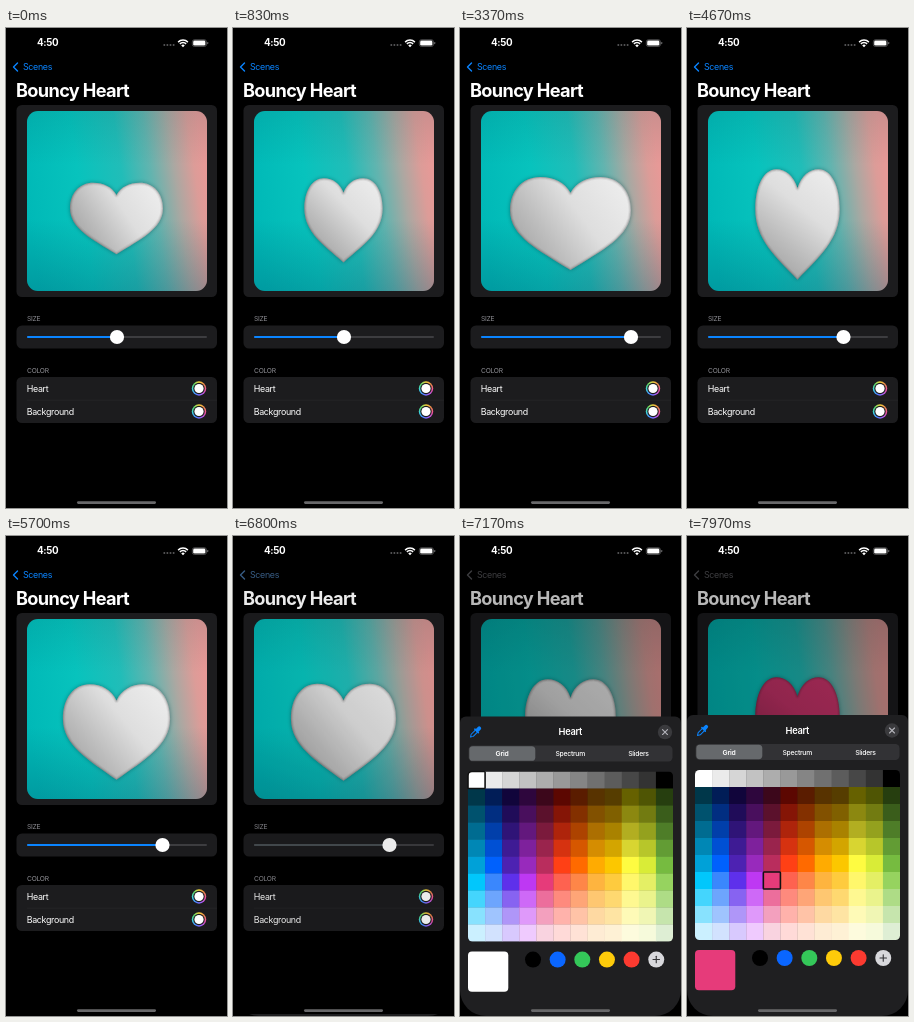
An HTML page with a canvas for the animation above (8000 ms loop, 221 by 480 pixels).

```html
<!DOCTYPE html>
<html lang="en">
<head>
<meta charset="utf-8">
<title>Bouncy Heart</title>
<style>
html, body { margin: 0; width: 100%; height: 100%; overflow: hidden; background: #000; }
canvas { display: block; width: 221px; height: 480px; }
</style>
</head>
<body>
<canvas id="stage"></canvas>
<script>
const W = 221, H = 480, LOOP = 8000;
const FONT = 'Inter, "Liberation Sans", sans-serif';
const BLUE = [10, 132, 255], WHITE = [255, 255, 255], PINK = [230, 59, 122];
const SHEET_Y = 179, SHEET_START = 6795, PICK = 7570;

const canvas = document.getElementById('stage');
const dpr = window.devicePixelRatio || 1;
canvas.width = W * dpr;
canvas.height = H * dpr;
const c = canvas.getContext('2d');
c.scale(dpr, dpr);

const clamp = v => Math.min(1, Math.max(0, v));
const lerp = (a, b, k) => a + (b - a) * k;
const smooth = k => k * k * (3 - 2 * k);
const mix = (a, b, k) => a.map((v, i) => lerp(v, b[i], k));
const rgb = (a, k = 1) => `rgb(${a.map(v => Math.round(Math.min(255, v * k)))})`;
const hex = s => [0, 2, 4].map(i => parseInt(s.substr(i, 2), 16));

// Linear interpolation through [time, value] keys
function track(keys, t) {
  for (let i = 1; i < keys.length; i++) {
    const [t0, a] = keys[i - 1], [t1, b] = keys[i];
    if (t <= t1) return lerp(a, b, clamp((t - t0) / (t1 - t0)));
  }
  return keys[keys.length - 1][1];
}

function box(x, y, w, h, r, fill) {
  c.beginPath();
  c.roundRect(x, y, w, h, r);
  c.fillStyle = fill;
  c.fill();
}

function disc(x, y, r, fill) {
  c.beginPath();
  c.arc(x, y, r, 0, Math.PI * 2);
  c.fillStyle = fill;
  c.fill();
}

function line(points, color, width) {
  c.beginPath();
  points.forEach(([x, y]) => c.lineTo(x, y));
  c.strokeStyle = color;
  c.lineWidth = width;
  c.lineCap = c.lineJoin = 'round';
  c.stroke();
}

function text(s, x, y, size, color, weight = 400, align = 'left') {
  c.font = `${weight} ${size}px ${FONT}`;
  c.letterSpacing = -size * 0.037 + 'px';
  c.textAlign = align;
  c.fillStyle = color;
  c.fillText(s, x, y);
}

function gradient(x0, y0, x1, y1, stops) {
  const g = c.createLinearGradient(x0, y0, x1, y1);
  stops.forEach(([at, color]) => g.addColorStop(at, color));
  return g;
}

// Heart bounce: even phases are widest, odd phases are tallest
const PHASE = [[0, 0], [1870, 1.28], [3370, 2], [4670, 3], [6370, 4.12],
  [6730, 4.16], [6800, 4.37], [7170, 4.69], [7970, 5], [8000, 5.02]];

function knobX(t) {
  const up = smooth(clamp((t - 2500) / 780));
  const back = smooth(clamp((t - 3550) / 550));
  return 111 + 60 * up - 14.5 * back;
}

function heartPath(x, top, hw, h) {
  const side = s => {
    const p = (u, v) => [x + s * hw * u, top + h * v];
    const curve = (...q) => c.bezierCurveTo(...q.flatMap(([u, v]) => p(u, v)));
    return { p, curve };
  };
  const R = side(1), L = side(-1);
  c.beginPath();
  c.moveTo(...R.p(0, 0.17));
  R.curve([0.09, 0.06], [0.28, 0], [0.5, 0]);
  R.curve([0.8, 0], [1, 0.15], [1, 0.36]);
  R.curve([1, 0.64], [0.52, 0.79], [0, 1]);
  L.curve([0.52, 0.79], [1, 0.64], [1, 0.36]);
  L.curve([1, 0.15], [0.8, 0], [0.5, 0]);
  L.curve([0.28, 0], [0.09, 0.06], [0, 0.17]);
  c.closePath();
}

function heart(t) {
  const p = (1 - Math.cos(Math.PI * track(PHASE, t))) / 2;
  const s = 1 + 0.005 * (knobX(t) - 111);
  const hw = s * lerp(46.5, 34.4, p);
  const top = 174 - s * lerp(19.2, 26.6, p);
  const bottom = 174 + s * (52.3 + 11 * p ** 0.6);
  const base = mix(WHITE, PINK, clamp((t - PICK) / 200));
  const x = 110.5;

  c.save();
  heartPath(x, top, hw, bottom - top);
  c.shadowColor = 'rgba(0,50,55,.45)';
  c.shadowBlur = 4 * dpr;
  c.fillStyle = gradient(x - hw, bottom - 15, x + hw * 0.8, top, [
    [0, rgb(base, 0.62)], [0.3, rgb(base, 0.74)], [0.6, rgb(base, 0.87)], [1, rgb(base, 0.93)]]);
  c.fill();
  c.shadowColor = 'transparent';
  c.clip();
  // Soft darker rim
  [[5, 0.06], [3, 0.1], [1.4, 0.16]].forEach(([width, alpha]) => {
    c.strokeStyle = `rgba(40,40,45,${alpha})`;
    c.lineWidth = width;
    c.stroke();
  });
  c.restore();
}

function scene(t) {
  c.save();
  c.beginPath();
  c.roundRect(21, 83, 180, 180, 11);
  c.clip();
  c.fillStyle = gradient(22, 185, 202, 160, [
    [0, '#00b9b7'], [0.3, '#07c3bd'], [0.54, '#21bdb8'], [0.7, '#62b4af'],
    [0.83, '#aaa8a2'], [0.94, '#dc9c98'], [1, '#e79997']]);
  c.fillRect(21, 83, 180, 180);
  c.fillStyle = gradient(0, 83, 0, 263, [
    [0, 'rgba(0,70,75,.12)'], [0.3, 'rgba(0,70,75,0)'], [0.6, 'rgba(0,60,80,0)'], [1, 'rgba(0,60,90,.24)']]);
  c.fillRect(21, 83, 180, 180);
  heart(t);
  c.restore();
}

function colorWell(x, y) {
  const g = c.createConicGradient(-Math.PI / 2, x, y);
  ['#f5d33b', '#f28a4d', '#ef4fa0', '#a45cf5', '#4c7dff', '#3cd3e8', '#58dc70', '#f5d33b']
    .forEach((color, i) => g.addColorStop(i / 7, color));
  disc(x, y, 7.2, g);
  disc(x, y, 5.7, '#1c1c1e');
  disc(x, y, 4.6, '#fff');
}

function page(t) {
  const fade = clamp((t - 6700) / 150);
  const tint = rgb(mix(BLUE, [84, 84, 88], fade));
  const track = rgb(mix(BLUE, [72, 78, 82], clamp(fade * 1.5)));
  const card = '#1c1c1e';

  line([[11.5, 35], [7.5, 39], [11.5, 43]], tint, 1.4);
  text('Scenes', 17, 42.3, 8.9, tint);
  text('Bouncy Heart', 10, 69.3, 18.2, '#fff', 700);

  box(10.5, 77, 200.5, 192, 5.5, card);
  scene(t);

  text('SIZE', 21, 293.3, 6.7, '#8d8d93');
  box(10.5, 297.5, 200.5, 23, 5.5, card);
  const x = knobX(t);
  box(21, 308, 180, 2, 1, '#3d3d40');
  box(21, 308, x - 21, 2, 1, track);
  disc(x, 309, 7.1, '#fff');

  text('COLOR', 21, 344.5, 6.7, '#8d8d93');
  box(10.5, 349, 200.5, 46, 5.5, card);
  c.fillStyle = '#29292c';
  c.fillRect(21, 371.8, 190, 0.6);
  text('Heart', 20.7, 363.9, 8.9, '#fff');
  text('Background', 20.7, 386.8, 8.9, '#fff');
  colorWell(193, 360.5);
  colorWell(193, 383.5);
}

function statusBar() {
  text('4:50', 31, 18.4, 9.8, '#fff', 700);
  for (let i = 0; i < 4; i++) disc(158.3 + i * 3.1, 17, 1, '#58585a');
  c.lineCap = 'butt';
  c.strokeStyle = '#fff';
  c.lineWidth = 1.5;
  [6.9, 4.4].forEach(r => {
    c.beginPath();
    c.arc(177, 19, r, -Math.PI * 0.75, -Math.PI * 0.25);
    c.stroke();
  });
  c.beginPath();
  c.moveTo(177, 19.2);
  c.arc(177, 19.2, 2.5, -Math.PI * 0.75, -Math.PI * 0.25);
  c.fillStyle = '#fff';
  c.fill();
  c.beginPath();
  c.roundRect(186.3, 11.7, 14.2, 6.8, 2.2);
  c.strokeStyle = '#77777a';
  c.lineWidth = 0.6;
  c.stroke();
  box(187.2, 12.6, 12.2, 5, 1.4, '#fff');
  box(201.3, 14, 0.9, 2.3, 0.5, '#88888a');
}

// Palette columns at rows 1, 5, 6 and 9; rows between are blends
const KEY_ROWS = [
  [1, '00374a 011d57 11053b 2e063d 3c071b 5c0701 5a1c00 583300 563d00 666100 4f5504 263e0f'],
  [5, '00a1d8 0061fd 4d22b2 982abc b92d5d ff4015 ff6a00 ffab01 fcc700 fefb41 d9ec37 76bb40'],
  [6, '01c7fc 3a87fd 5e30eb be38f3 e63b7a fe6250 fe8648 feb43f fecb3e fff76b e4ef65 96d35f'],
  [9, 'cbf0ff d2e2fe d8c9fe efcafe f9d3e0 ffdad8 ffe2d6 feecd4 fef1d5 fdfbdd f6fadb deeed4']
].map(([row, list]) => [row, list.split(' ').map(hex)]);

function cellColor(row, col) {
  if (row === 0) {
    const v = col === 11 ? 0 : 255 - 20.4 * col;
    return rgb([v, v, v]);
  }
  const i = Math.max(1, KEY_ROWS.findIndex(k => k[0] >= row));
  const [r0, a] = KEY_ROWS[i - 1], [r1, b] = KEY_ROWS[i];
  return rgb(mix(a[col], b[col], (row - r0) / (r1 - r0)));
}

function palette(picked) {
  const x = 8, y = 55, w = 205 / 12, h = 17;
  c.save();
  c.beginPath();
  c.roundRect(x, y, 205, 170, 4.5);
  c.clip();
  for (let row = 0; row < 10; row++) {
    for (let col = 0; col < 12; col++) {
      c.fillStyle = cellColor(row, col);
      c.fillRect(x + col * w, y + row * h, w + 0.3, h + 0.3);
    }
  }
  c.restore();
  const [row, col] = picked ? [6, 4] : [0, 0];
  c.beginPath();
  c.roundRect(x + col * w, y + row * h, w, h, picked ? 0.8 : [4, 0.8, 0.8, 0.8]);
  c.strokeStyle = '#111';
  c.lineWidth = 1.6;
  c.stroke();
}

function eyedropper() {
  c.save();
  c.translate(15.2, 15.8);
  c.rotate(Math.PI / 4);
  box(-1.9, -7.6, 3.8, 6, 1.9, rgb(BLUE));
  box(-3.2, -2.8, 6.4, 1.6, 0.7, rgb(BLUE));
  line([[-1.5, -1.4], [-1.5, 4.2], [0, 6.6], [1.5, 4.2], [1.5, -1.4]], rgb(BLUE), 1);
  c.restore();
}

function sheet(t) {
  const k = 19.7 * Math.max(0, t - SHEET_START) / 1000;
  const y = SHEET_Y + (H - SHEET_Y) * (1 + k) * Math.exp(-k);
  if (y > H - 0.5) return;
  const picked = t >= PICK;

  c.save();
  // Rounded screen corners at the bottom
  c.fillStyle = '#000';
  c.fillRect(0, Math.max(y + 12, H - 26), W, 26);
  c.beginPath();
  c.roundRect(0, -40, W, H + 40, [0, 0, 26, 26]);
  c.clip();
  c.translate(0, y);
  box(0, 0, W, H, [6, 6, 0, 0], '#1f1f21');

  eyedropper();
  text('Heart', 110.2, 18.6, 9.3, '#fff', 600, 'center');
  disc(205, 15.5, 7.2, '#3a3a3d');
  line([[202.5, 13], [207.5, 18]], '#b4b4ba', 1.1);
  line([[207.5, 13], [202.5, 18]], '#b4b4ba', 1.1);

  box(8.5, 29, 204, 16, 4.2, '#323235');
  box(9.3, 29.8, 66, 14.4, 3.6, '#66696c');
  ['Grid', 'Spectrum', 'Sliders'].forEach((s, i) =>
    text(s, 42 + i * 68.2, 39.5, 6.8, '#fff', i ? 500 : 600, 'center'));

  palette(picked);

  box(8, 235, 40.3, 40.3, 4, rgb(picked ? PINK : WHITE));
  ['#000', '#0a66ff', '#34c759', '#fecb0a', '#fc3a30', '#d8d8dc'].forEach((color, i) =>
    disc(73 + i * 24.65, 243, 8, color));
  line([[193, 243], [199.5, 243]], '#333336', 1.1);
  line([[196.25, 239.75], [196.25, 246.25]], '#333336', 1.1);
  c.restore();
}

function draw(t) {
  c.fillStyle = '#000';
  c.fillRect(0, 0, W, H);
  page(t);
  const dim = 0.28 * smooth(clamp((t - 6710) / 260));
  if (dim > 0) {
    c.fillStyle = `rgba(0,0,0,${dim})`;
    c.fillRect(0, 0, W, H);
  }
  sheet(t);
  statusBar();
  box(71, 473.3, 79, 2.6, 1.3, '#68686a');
}

const start = performance.now();
function frame() {
  draw((performance.now() - start) % LOOP);
  requestAnimationFrame(frame);
}
frame();
</script>
</body>
</html>
```
